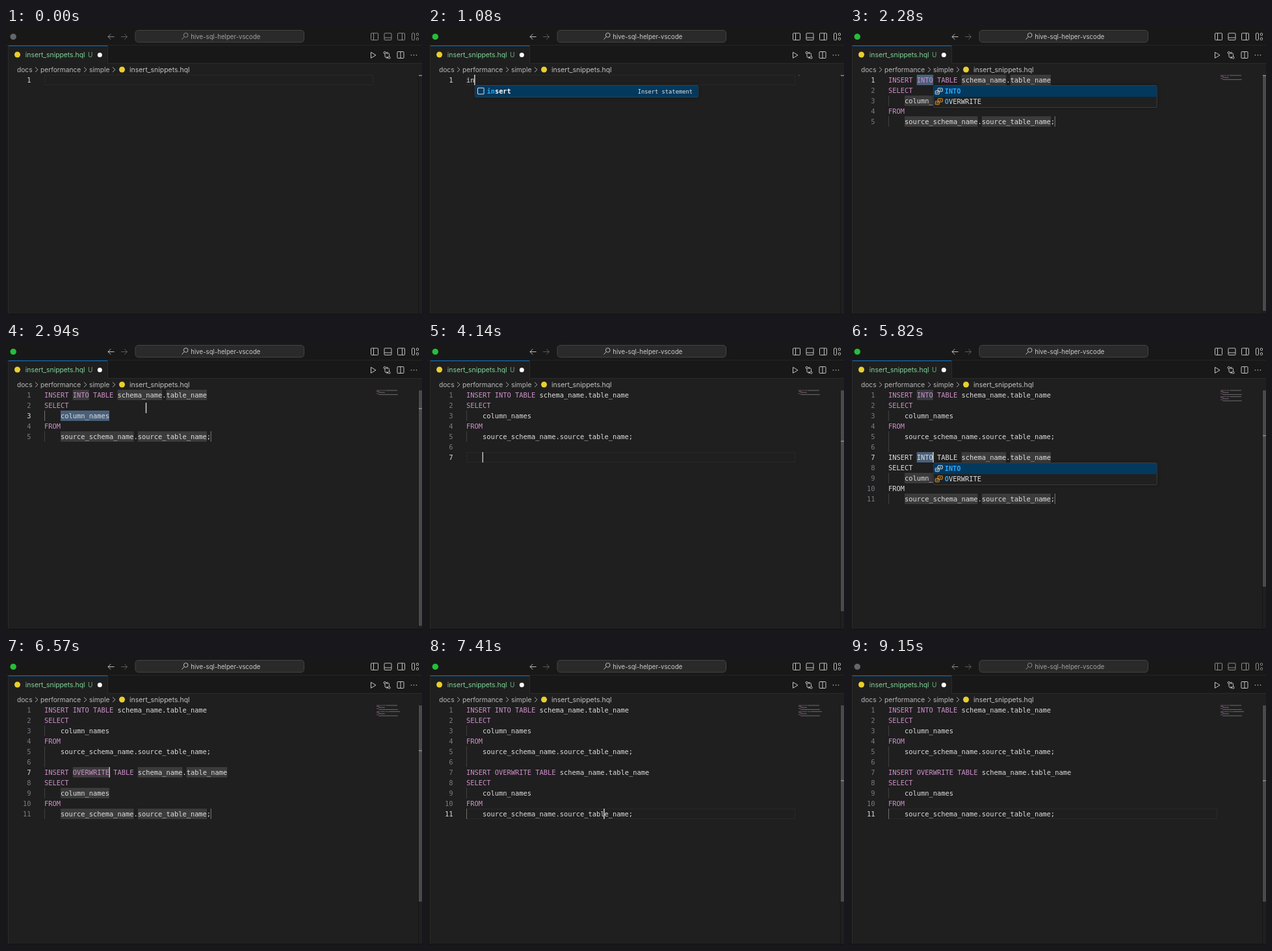
Recreate the animation shown at these times as an HTML page with a canvas. Size 640x442 px, loop 9.18 s.

```html
<!DOCTYPE html>
<html lang="en">
<head>
<meta charset="utf-8">
<title>Insert snippets</title>
<style>
html, body { margin: 0; width: 100%; height: 100%; overflow: hidden; background: #1f1f1f; }
canvas { display: block; width: 640px; height: 442px; }
</style>
</head>
<body>
<canvas id="stage"></canvas>
<script>
const W = 640, H = 442, LOOP = 9180;
const LEFT = 59, TOP = 72, ROW = 16, CHAR = 6.25, VIEW = 418;
const MONO = '"DejaVu Sans Mono", monospace', UI = 'Inter, sans-serif';
const CODE = '10.38px ' + MONO;
const TEXT = '#dedede', KEYWORD = '#cf8fca', ICON = '#c5c5c5', BLUE = '#2aaaff';

const canvas = document.getElementById('stage');
const ctx = canvas.getContext('2d');
const dpr = window.devicePixelRatio || 1;
canvas.width = W * dpr;
canvas.height = H * dpr;

// ---------- drawing helpers ----------
function rect(x, y, w, h, color) {
  ctx.fillStyle = color;
  ctx.fillRect(x, y, w, h);
}
function label(str, x, mid, color, font, align = 'left') {
  ctx.font = font;
  ctx.fillStyle = color;
  ctx.textAlign = align;
  ctx.fillText(str, x, mid + 3.8);
}
function disc(x, y, r, color) {
  ctx.fillStyle = color;
  ctx.beginPath();
  ctx.arc(x, y, r, 0, 7);
  ctx.fill();
}
function ring(x, y, r, color) {
  ctx.strokeStyle = color;
  ctx.lineWidth = 1;
  ctx.beginPath();
  ctx.arc(x, y, r, 0, 7);
  ctx.stroke();
}
function stroke(path, color, width = 1) {
  ctx.strokeStyle = color;
  ctx.lineWidth = width;
  ctx.stroke(new Path2D(path));
}
function box(x, y, w, h, r, fill, line) {
  ctx.beginPath();
  ctx.roundRect(x, y, w, h, r);
  if (fill) { ctx.fillStyle = fill; ctx.fill(); }
  if (line) { ctx.strokeStyle = line; ctx.lineWidth = 1; ctx.stroke(); }
}
const colX = col => LEFT + col * CHAR;
const lineY = line => TOP + line * ROW;

// ---------- script of the edit ----------
const snippet = kind => [
  `INSERT ${kind} TABLE schema_name.table_name`,
  'SELECT',
  '    column_names',
  'FROM',
  '    source_schema_name.source_table_name;'
];
function tabStops(kind, base) {
  const s = kind.length + 14;
  return [[0, 7, 7 + kind.length], [0, s, s + 11], [0, s + 12, s + 22],
    [2, 4, 16], [4, 4, 22], [4, 23, 40], [4, 41, 41]]
    .map(([line, a, b]) => [line + base, a, b]);
}

const states = [];
function at(t, lines, line, col, extra = {}) {
  states.push({ t, lines, line, col, ...extra });
}
// Selects one tab stop of a running snippet.
function stopAt(t, lines, kind, base, i, extra = {}) {
  const stops = tabStops(kind, base), [line, a, b] = stops[i];
  const done = i === stops.length - 1;
  at(t, lines, line, b, { stops: done ? [] : stops, sel: done ? null : [line, a, b], ...extra });
}

const first = snippet('INTO');
const head = [...first, ''];
const draft = [...head, ...snippet('INTO')];
const full = [...head, ...snippet('OVERWRITE')];

at(0, [''], 0, 0);
at(30, [''], 0, 0);
at(960, ['i'], 0, 1);
at(1020, ['in'], 0, 2, { popup: 'insert' });
stopAt(1380, first, 'INTO', 0, 0, { popup: 'choice', pick: 0, raw: 0 });
stopAt(1570, first, 'INTO', 0, 0, { popup: 'choice', pick: 0 });
at(2490, first, 0, 11, { stops: tabStops('INTO', 0), glide: true });
[2610, 2760, 2910, 3060, 3210, 3390].forEach((t, i) =>
  stopAt(t, first, 'INTO', 0, i + 1, { glide: true }));
at(3900, [...first, '    '], 5, 4);
at(4020, [...head, '    '], 6, 4);
at(4290, [...head, ''], 6, 0);
at(4860, [...head, 'i'], 6, 1);
at(5190, [...head, 'in'], 6, 2, { popup: 'insert' });
stopAt(5820, draft, 'INTO', 6, 0, { popup: 'choice', pick: 0, raw: 6 });
stopAt(5970, draft, 'INTO', 6, 0, { popup: 'choice', pick: 0 });
stopAt(6240, draft, 'INTO', 6, 0, { popup: 'choice', pick: 1 });
at(6450, full, 6, 16, { stops: tabStops('OVERWRITE', 6) });
[6750, 6900, 7050, 7200].forEach((t, i) =>
  stopAt(t, full, 'OVERWRITE', 6, i + 1, { glide: true }));
stopAt(7380, full, 'OVERWRITE', 6, 6, { glide: true });

// ---------- window chrome ----------
function titleBar(focused) {
  const main = focused ? '#cccccc' : '#a2a2a2';
  const icon = focused ? '#c0c0c0' : '#8c8c8c';
  disc(11.2, 13.4, 4.7, focused ? '#25be3a' : '#666666');
  stroke('M166.5 13.5h-9.5m4.2-4.2l-4.2 4.2l4.2 4.2', icon);
  stroke('M177 13.5h9.5m-4.2-4.2l4.2 4.2l-4.2 4.2', '#5c5c5c');
  box(199, 3.5, 259.5, 18.5, 4.5, '#2a2a2a', '#444444');
  stroke('M280 11a3.3 3.3 0 1 0-6.6 0a3.3 3.3 0 1 0 6.6 0M274.3 13.4l-3.8 4.2', icon);
  label('hive-sql-helper-vscode', 284.3, 13, main, '9.65px ' + UI);

  for (const [x, part] of [[567, 'M565.5 8v10'], [587.5, 'M582 15h11'], [608, 'M609.5 8v10']]) {
    box(x - 5.5, 8, 11, 10.5, 1, null, icon);
    stroke(part, icon);
  }
  box(624.5, 8, 4, 10.5, 1, null, icon);
  box(631.5, 8, 3, 3.5, 1, null, icon);
  box(631.5, 15, 3, 3.5, 1, null, icon);
}
function chevron(x) {
  stroke(`M${x - 2} 60.5l4 3.7l-4 3.7`, '#a8a8a8');
}
function chrome(focused) {
  rect(0, 0, W, H, '#1f1f1f');
  rect(0, 0, W, 55, '#181818');
  rect(0, 26, W, 1, '#242424');
  rect(0, 54, W, 1, '#2b2b2b');
  rect(4, 27, 152, 28, '#1f1f1f');
  rect(4, 27, 152, 1, '#0078d4');
  rect(156, 27, 1, 28, '#2b2b2b');
  rect(0, 27, 3, H - 27, '#181818');
  rect(3, 27, 1, H - 27, '#2b2b2b');
  titleBar(focused);

  disc(17.5, 41, 4.5, '#e8cf2f');
  label('insert_snippets.hql', 29.8, 41, '#7fd69b', '10.35px ' + UI);
  label('U', 126, 41, '#67b081', '10px ' + UI);
  disc(144.3, 41.5, 3.5, '#ffffff');

  stroke('M561.5 37.3l7.5 4.5l-7.5 4.5z', ICON);
  stroke('M583 39.5v4q0 2 2 2h2.5m-1.8-1.8l1.8 1.8l-1.8 1.8M589.5 44v-3.5q0-2-2-2h-2.3m1.8-1.8l-1.8 1.8l1.8 1.8', ICON);
  ring(582.7, 38, 1.6, ICON);
  ring(589.5, 45.6, 1.6, ICON);
  box(602, 36.5, 10, 10, 1, null, ICON);
  stroke('M607 36.5v10', ICON);
  for (const x of [623.5, 627.5, 631.5]) disc(x, 41.8, 0.8, ICON);

  const crumb = '10.2px ' + UI, grey = '#bababa';
  label('docs', 17, 64, grey, crumb);
  chevron(47);
  label('performance', 53, 64, grey, crumb);
  chevron(122);
  label('simple', 128, 64, grey, crumb);
  chevron(166);
  disc(178.5, 64, 4.5, '#e8cf2f');
  label('insert_snippets.hql', 190, 64, '#c4c4c4', '10.45px ' + UI);
}

// ---------- editor ----------
function mark(line, a, b, color) {
  rect(colX(a), lineY(line), (b - a) * CHAR, ROW, color);
}
function highlights(s) {
  if (!s.sel && !s.stops?.length) {
    ctx.strokeStyle = '#282828';
    ctx.lineWidth = 1;
    ctx.strokeRect(LEFT + 0.5, lineY(s.line) + 0.5, 505, ROW - 1);
  }
  if (s.sel) {
    const [line, a, b] = s.sel;
    const word = s.lines[line].slice(a, b);
    s.lines.forEach((str, i) => {
      for (const m of str.matchAll(/\w+/g)) {
        if (m[0] === word && i !== line) mark(i, m.index, m.index + word.length, '#373b40');
      }
    });
  }
  for (const [line, a, b] of s.stops || []) {
    mark(line, a, b, '#3b3b3b');
    if (a === b) rect(colX(a) - 0.5, lineY(line), 1, ROW, '#7c7c7c');
  }
  if (s.sel) mark(...s.sel, '#49607a');
}
function code(s) {
  s.lines.forEach((str, i) => {
    const mid = lineY(i) + 8, active = i === s.line;
    label(i + 1, 38.5, mid, active ? '#dcdcdc' : '#767d85', CODE, 'right');
    const indented = /^ +\S/.test(str);
    if (indented || (i === 5 && s.lines.length > 10)) {
      rect(LEFT, lineY(i), 1, ROW, active && indented ? '#707070' : '#404040');
    }
    for (const m of str.matchAll(/\S+/g)) {
      const key = /^[A-Z]+$/.test(m[0]) && !(i >= s.raw);
      label(m[0], colX(m.index), mid, key ? KEYWORD : TEXT, CODE);
    }
  });
}
function minimap(s) {
  s.lines.forEach((str, i) => {
    for (const m of str.matchAll(/\S+/g)) {
      const key = /^[A-Z]+$/.test(m[0]);
      rect(570 + m.index * 0.8, 72.5 + i * 1.6, m[0].length * 0.8, 1,
        key ? 'rgba(197,134,192,.5)' : 'rgba(214,214,214,.42)');
    }
  });
}
function scrollbar(s) {
  const scale = VIEW / (VIEW + (s.lines.length - 1) * ROW);
  rect(634, 73, 1, H - 73, '#161616');
  if (s.lines.length > 1) rect(635, 73, 5, VIEW * scale, '#4a4a4a');
  rect(635, 72.5 + s.line * ROW * scale, 5, 1.5, '#8c8c8c');
  rect(0, 440, W, 2, '#151515');
}

// ---------- suggestion list ----------
function enumIcon(x, y, color) {
  box(x + 4.5, y - 4.5, 7, 5, 0.5, null, color);
  box(x + 0.5, y - 0.5, 6, 5, 0.5, null, color);
  stroke(`M${x + 7} ${y - 2}h2.5M${x + 2} ${y + 2}h3`, color);
}
// Draws a suggestion with its matched letters in blue.
function match(str, hits, x, mid, font, color) {
  label(str.slice(0, hits), x, mid, BLUE, 'bold 10.2px ' + MONO);
  label(str.slice(hits), x + hits * CHAR, mid, color, font);
}
function popup(s) {
  const x = colX(s.col) + 0.5, y = lineY(s.line) + 16.5;
  const rows = s.popup === 'insert' ? 1 : 2;
  ctx.shadowColor = 'rgba(0,0,0,.45)';
  ctx.shadowBlur = 5 * dpr;
  box(x, y, 344, rows * ROW + 2, 2, '#202020');
  ctx.shadowColor = 'transparent';
  box(x, y, 344, rows * ROW + 2, 2, null, '#3a3d40');
  rect(x + 0.5, y + 0.5 + (s.pick || 0) * ROW, 343, ROW + 1, '#04395e');
  const mid = y + 8.8;
  if (rows === 1) {
    box(x + 4.5, mid - 5, 9.5, 9.5, 0.5, null, '#e4e4e4');
    match('insert', 2, x + 18.5, mid, 'bold 10.2px ' + MONO, '#ffffff');
    label('Insert statement', x + 335, mid - 0.5, '#e2e2e2', '8.75px ' + MONO, 'right');
    return;
  }
  const low = mid + ROW;
  enumIcon(x + 2.5, mid, s.pick === 0 ? '#e4e4e4' : '#ee9d28');
  enumIcon(x + 2.5, low, s.pick === 1 ? '#e4e4e4' : '#ee9d28');
  match('INTO', 4, x + 17.5, mid, CODE, TEXT);
  match('OVERWRITE', 1, x + 17.5, low, CODE, TEXT);
}

// ---------- caret ----------
function caret(s, prev, t) {
  const age = t - s.t;
  // Smooth blink: hold, fade, stay hidden, then the same backwards.
  const phase = age % 1000;
  const half = phase < 500 ? phase : 1000 - phase;
  const alpha = Math.min(1, Math.max(0, (300 - half) / 200));
  const p = s.glide ? Math.min(1, age / 80) : 1;
  const k = 1 - (1 - p) ** 2;
  const x = colX(prev.col + (s.col - prev.col) * k);
  const y = lineY(prev.line + (s.line - prev.line) * k);
  ctx.globalAlpha = alpha;
  rect(x - 0.5, y, 1.5, ROW, '#d0d0d0');
  ctx.globalAlpha = 1;
}

function draw(t) {
  const i = states.findLastIndex(s => s.t <= t);
  const s = states[i];
  const focused = t >= 30 && t < 9000;
  ctx.setTransform(dpr, 0, 0, dpr, 0, 0);
  chrome(focused);
  highlights(s);
  code(s);
  minimap(s);
  scrollbar(s);
  if (focused) caret(s, states[Math.max(0, i - 1)], t);
  if (s.popup) popup(s);
}

const start = performance.now();
function tick() {
  draw((performance.now() - start) % LOOP);
  requestAnimationFrame(tick);
}
tick();
</script>
</body>
</html>
```
